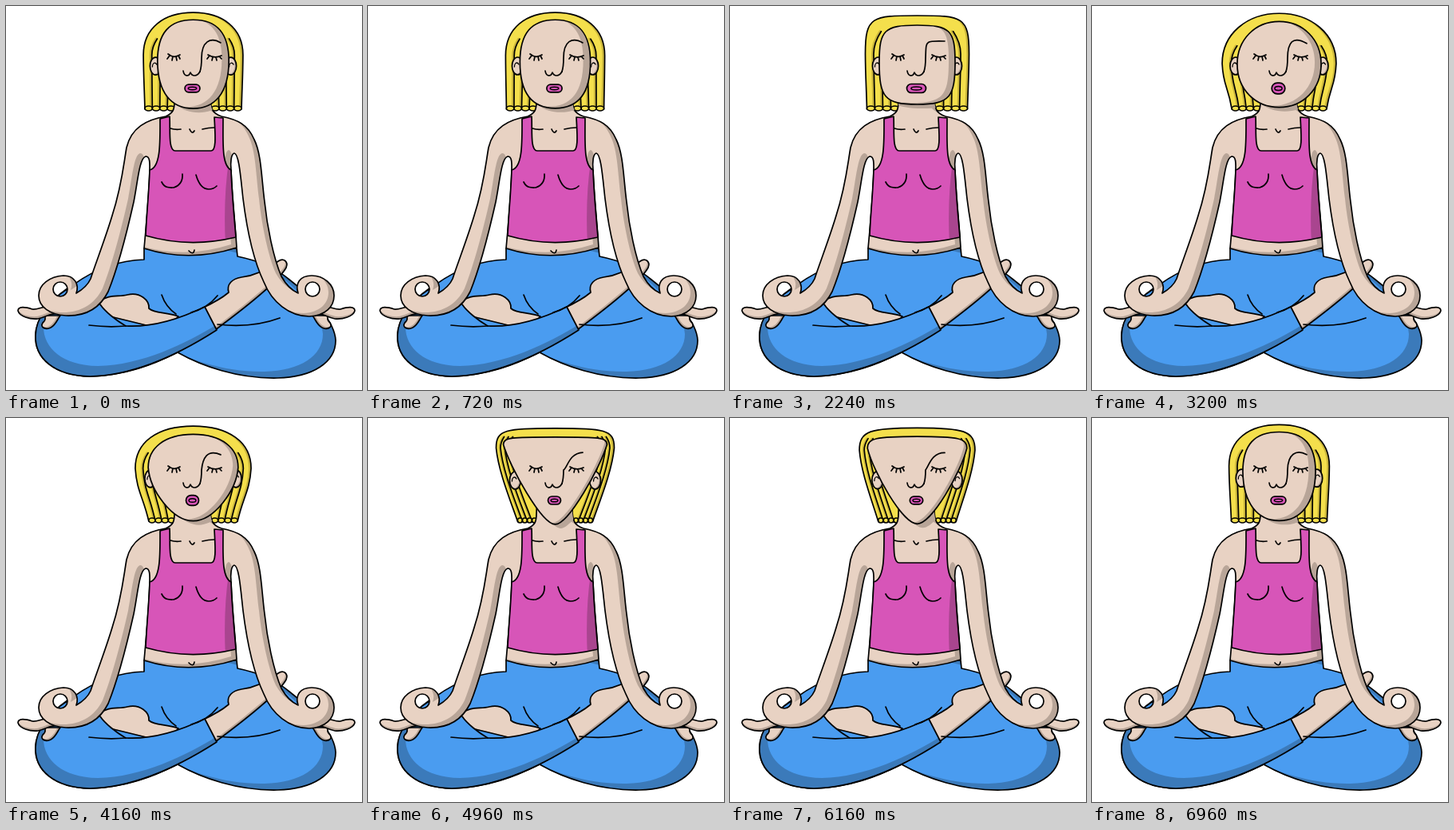
Animation of 446 by 480 pixels, one loop 7040 ms. Source, as an HTML page with a canvas:

```html
<!DOCTYPE html>
<html lang="en">
<head>
<meta charset="utf-8">
<title>Meditation</title>
<style>
html, body { margin: 0; width: 100%; height: 100%; overflow: hidden; background: #fff; }
canvas { display: block; }
</style>
</head>
<body>
<canvas id="stage" width="446" height="480"></canvas>
<script>
const ctx = document.getElementById('stage').getContext('2d');
const LOOP = 7040, CX = 234.5;
const SKIN = ['#e8d2c3', '#b8a598'], PINK = ['#d755b8', '#a9458f'];
const BLUE = ['#4a9cf0', '#3b7aba'], HAIR = ['#f4df4c', '#c9b43a'];

// Half-width, handle and height values for each head shape
const heads = [
  { // oval
    start: 160, end: 560,
    face: [17, 29, 44, 70, 36, 40, 0, 128, 28],
    hair: [8, 36, 62, 62, 34, 61], ear: [47, 75],
    brow: [46, 256, 38, 245, 44], mouth: [9.5, 4.8], shade: [9]
  },
  { // square
    start: 1920, end: 2320,
    face: [24, 41, 47.5, 70, 40, 44, 0, 123, 41],
    hair: [12, 57, 65, 60, 47, 63], ear: [49, 75],
    brow: [44, 243, 43, 246, 44], mouth: [12, 5.5], shade: [8]
  },
  { // circle
    start: 3400, end: 3680,
    face: [19, 29, 53, 73, 30, 30, 0, 127, 29],
    hair: [9, 39, 72, 73, 36, 59], ear: [55, 75],
    brow: [47, 252, 36, 245, 46], mouth: [8, 7], shade: [8]
  },
  { // triangle
    start: 5040, end: 5840,
    face: [24, 55, 65, 33, 9, 27, 8, 133, 17],
    hair: [13, 62, 74, 37, 23, 47], ear: [50, 78],
    brow: [43, 252, 44, 250, 62], mouth: [8, 5], shade: [3]
  }
];

const path = d => new Path2D(d);
const mix = (a, b, k) => a + (b - a) * k;

const upper = path(`M212 95L211 120C211 128 210 134 200 138C176 142 157 152 151 177C147 200 145 225 133 262
  C124 292 111 325 106 341C102 350 95 355 88 359C92 348 86 337 72 337C55 338 41 348 41 362
  C41 376 55 386 75 387C100 388 118 377 128 357C139 330 151 285 160 245C165 220 167 190 175 188
  C181 188 180 198 180 206C179 240 176 270 173 303Q230 321 289 302C287 270 283 235 282 205
  C281 195 282 185 286 184C292 185 294 215 297 241C302 281 311 320 323 345C333 370 355 388 380 388
  C400 387 411 376 411 362C411 348 398 337 383 337C368 337 362 347 366 359C357 355 350 347 345 338
  C335 315 327 275 324 245C320 215 320 185 311 167C303 148 290 142 270 138C258 134 257 128 256 118L256 95Z
  M59 354a9 9 0 1 0 18 0a9 9 0 1 0 -18 0Z M375 354a9 9 0 1 0 18 0a9 9 0 1 0 -18 0Z`);
const shirt = path(`M193 141L205 138C206 155 203 181 212 181L257 181C264 181 262 160 261 139L272 140
  C272 170 270 200 282 205C283 235 286 265 288 289Q230 303 175 287C176 260 179 235 180 205
  C194 202 193 170 193 141Z`);
const shirtShade = path('M279 195Q272 240 275 300L292 300L288 195Z');
const pants = path(`M173 303L173 317C140 318 110 330 85 348C60 362 37 390 37 412C36 440 60 462 105 463
  C150 462 185 448 215 433C245 450 290 466 340 465C385 464 413 445 413 418C412 395 385 365 355 342
  C335 325 310 317 290 313L289 303Z`);
const shin = path(`M118 373C124 382 138 393 150 400C185 402 220 390 249 376L264 405
  C225 430 165 462 105 463C60 462 36 440 37 412C37 390 55 368 75 355Z`);
const rightFoot = path(`M245 378C258 372 272 364 279 358C276 348 283 341 295 339C312 337 328 329 341 319
  C348 314 354 320 351 327C345 338 320 362 262 405Z`);
const leftFoot = path(`M116 370C128 360 140 364 152 361C168 357 180 368 179 378C187 385 200 382 216 388
  L200 405L118 385Z`);
const longFinger = path('M62 378C50 372 42 380 33 379C24 376 15 375 15 381C17 388 30 392 40 391C50 389 55 384 62 385Z');
const shortFinger = path('M50 387C47 390 52 391 46 396C42 402 50 405 56 402C63 398 64 392 68 387Z');
const legLines = path('M195 361Q200 376 213 385M232 383Q252 378 265 362M265 398Q308 403 343 390M104 399Q128 402 150 400');
const bodyLines = path(`M206 153Q212 155 219 154M246 154Q254 152 261 152M230 154Q233 161 236 156
  M229 306Q235 312 236 305M195 220C199 228 205 227 210 227Q222 223 221 210
  M238 211C242 225 248 229 254 229Q260 229 264 225`);
const faceLines = path(`M203 60Q210 66 218 61M205 62L202 66M209 63L208 68M213 63L214 68M216 62L218 66
  M253 61Q261 66 270 62M255 62L252 66M259 64L258 68M263 64L264 68M267 63L270 66
  M222 81C223 88 229 89 231 83C233 88 239 89 243 82`);

function line(p, width = 1.7) {
  ctx.lineWidth = width;
  ctx.strokeStyle = '#000';
  ctx.stroke(p);
}

// Outlined shape whose lit area is shifted to leave a shaded rim
function part(p, [light, dark], dx, dy, shade) {
  ctx.save();
  ctx.clip(p, 'evenodd');
  ctx.fillStyle = dark;
  ctx.fillRect(0, 0, 446, 480);
  ctx.translate(dx, dy);
  ctx.fillStyle = light;
  ctx.fill(p);
  if (shade) {
    ctx.fillStyle = dark;
    ctx.fill(shade);
  }
  ctx.restore();
  line(p);
}

function headAt(ms) {
  const t = ms < heads[0].start ? ms + LOOP : ms;
  const i = heads.findLastIndex(h => t >= h.start);
  const from = heads[i], to = heads[(i + 1) % heads.length];
  const next = i + 1 < heads.length ? to.start : to.start + LOOP;
  const u = Math.max(0, (t - from.end) / (next - from.end));
  const k = (1 - Math.cos(Math.PI * u)) / 2;
  const pose = {};
  for (const key of ['face', 'hair', 'ear', 'brow', 'mouth', 'shade'])
    pose[key] = from[key].map((v, n) => mix(v, to[key][n], k));
  return pose;
}

function facePath([top, th, w, sy, up, down, inset, bottom, bh]) {
  const p = new Path2D();
  p.moveTo(CX, top);
  p.bezierCurveTo(CX + th, top, CX + w, sy - up, CX + w, sy);
  p.bezierCurveTo(CX + w - inset, sy + down, CX + bh, bottom, CX, bottom);
  p.bezierCurveTo(CX - bh, bottom, CX - w + inset, sy + down, CX - w, sy);
  p.bezierCurveTo(CX - w, sy - up, CX - th, top, CX, top);
  p.closePath();
  return p;
}

function drawHair([top, th, w, sy, up, hb], faceW) {
  const c1 = mix(w, hb, .1), c2 = mix(w, hb, .62);
  const p = new Path2D();
  p.moveTo(CX - hb, 129);
  p.bezierCurveTo(CX - c2, 100, CX - c1, sy + 28, CX - w, sy);
  p.bezierCurveTo(CX - w, sy - up, CX - th, top, CX, top);
  p.bezierCurveTo(CX + th, top, CX + w, sy - up, CX + w, sy);
  p.bezierCurveTo(CX + c1, sy + 28, CX + c2, 100, CX + hb, 129);
  p.closePath();
  part(p, HAIR, -3, 0);

  const step = (hb - 23) / 4;
  for (const side of [-1, 1]) {
    for (let i = 1; i < 4; i++) {
      const x = w - i * .6 * (w - faceW), end = hb - i * step;
      const strand = new Path2D();
      strand.moveTo(CX + side * end, 129);
      strand.bezierCurveTo(CX + side * mix(x, end, .62), 100, CX + side * mix(x, end, .1), sy + 28, CX + side * x, sy);
      strand.quadraticCurveTo(CX + side * x, sy - up * .3, CX + side * (x - up * .2), sy - up * .6);
      ctx.save();
      ctx.clip(p);
      ctx.translate(-1.5, 0);
      ctx.lineWidth = step * .3;
      ctx.strokeStyle = HAIR[1];
      ctx.stroke(strand);
      ctx.restore();
      line(strand);
    }
    for (let i = 0; i < 4; i++) {
      const tip = new Path2D();
      tip.ellipse(CX + side * (hb - (i + .5) * step), 128, step / 2, 3, 0, 0, 7);
      ctx.fillStyle = HAIR[0];
      ctx.fill(tip);
      line(tip);
    }
  }
}

function drawEars([dx, y]) {
  for (const side of [-1, 1]) {
    const x = CX + side * dx, ear = new Path2D(), fold = new Path2D();
    ear.ellipse(x, y, 7, 11, 0, 0, 7);
    part(ear, SKIN, -2, -1);
    fold.ellipse(x + side, y + 1, 3, 5, 0, Math.PI, Math.PI * 1.8);
    line(fold, 1.3);
  }
}

function drawMouth([w, h]) {
  const lips = new Path2D(), gap = new Path2D();
  lips.roundRect(CX - 1 - w, 103 - h, w * 2, h * 2, Math.min(w, h));
  gap.ellipse(CX - 1, 103, w * .55, h * .36, 0, 0, 7);
  part(lips, PINK, 0, -1);
  line(gap, 1.5);
}

function drawLegs() {
  part(pants, BLUE, -16, -8);
  part(rightFoot, SKIN, -2, -2);
  part(leftFoot, SKIN, -1, -1);
  part(shin, BLUE, 10, -13);
  line(legLines);
}

function drawFingers() {
  part(shortFinger, SKIN, -2, -2);
  part(longFinger, SKIN, -1, -3);
}

function draw(now) {
  const { face, hair, ear, brow, mouth, shade } = headAt(now % LOOP);
  const shape = facePath(face);
  ctx.fillStyle = '#fff';
  ctx.fillRect(0, 0, 446, 480);
  ctx.lineJoin = ctx.lineCap = 'round';

  drawLegs();
  drawFingers();
  ctx.save();
  ctx.translate(452, 0);
  ctx.scale(-1, 1);
  drawFingers();
  ctx.restore();

  drawHair(hair, face[2]);
  part(upper, SKIN, -7, -4);
  ctx.save();
  ctx.clip(upper, 'evenodd');
  ctx.translate(7, 5);
  ctx.fillStyle = SKIN[1];
  ctx.fill(shape);
  ctx.restore();
  part(shirt, PINK, 0, 0, shirtShade);
  line(bodyLines);

  drawEars(ear);
  part(shape, SKIN, -shade[0], -2);
  line(faceLines);
  const [y, x1, y1, x2, y2] = brow;
  line(path(`M269 ${y}C${x1} ${y1} ${x2} ${y2} 245 65Q245 76 243 82`));
  drawMouth(mouth);
}

const begin = performance.now();
function frame() {
  draw(performance.now() - begin);
  requestAnimationFrame(frame);
}
frame();
</script>
</body>
</html>
```
